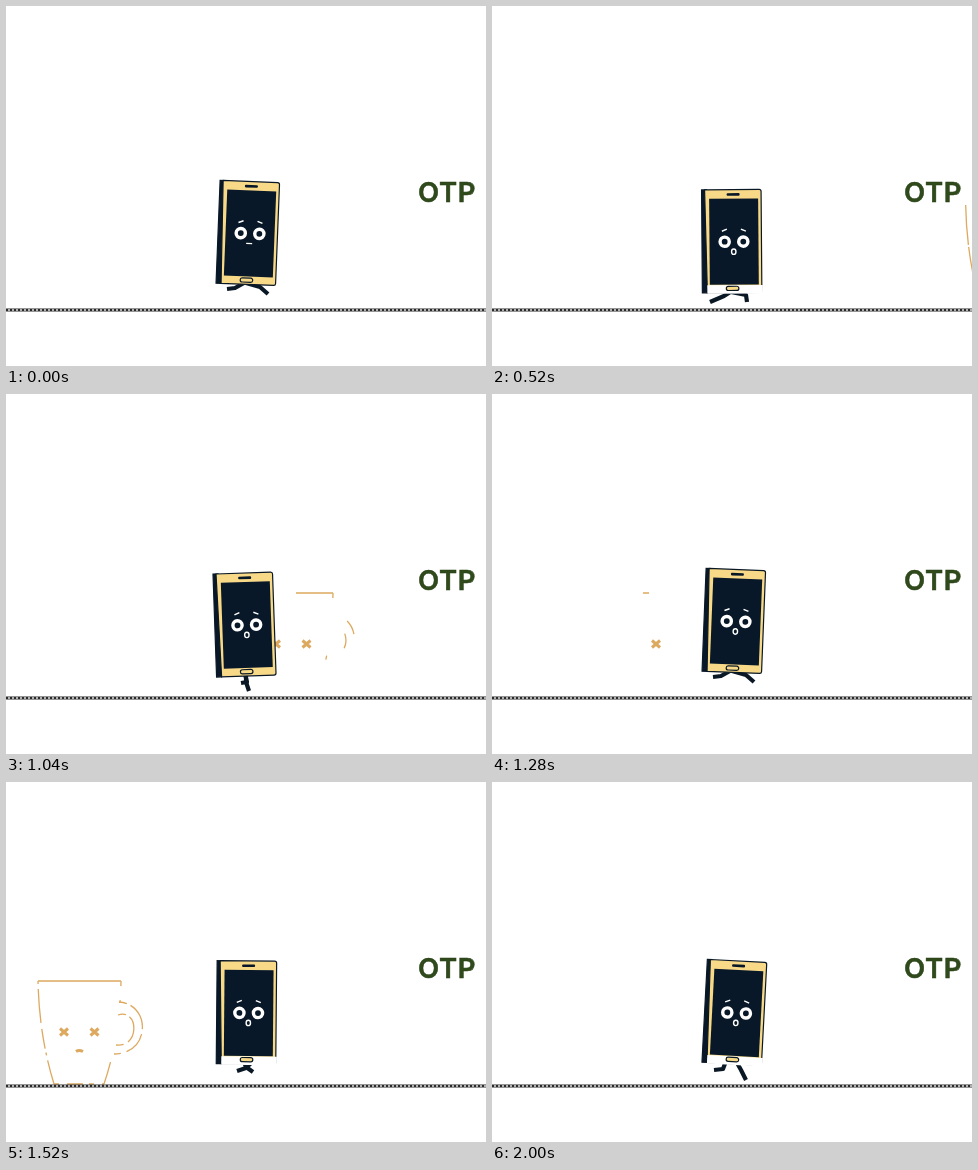
These frames come from a looping animation (480x360 px, 2.04 s). An HTML page:

```html
<!DOCTYPE html>
<html lang="en">
<head>
<meta charset="utf-8">
<title>Walking phone</title>
<style>
  html, body { margin: 0; width: 100%; height: 100%; overflow: hidden; background: #fff; }
  svg { display: block; width: 100vw; height: 100vh; }
  .otp { font: 600 27.5px Inter, "Open Sans", sans-serif; letter-spacing: .7px; fill: #2f4a1b; stroke: #263c14; stroke-width: .5; }
  .mug { fill: none; stroke: #dda95f; stroke-width: 1.3; }
  .mug .face { stroke-width: 3; }
  .leg { fill: none; stroke: #0a1826; stroke-width: 4.2; stroke-linejoin: round; }
  .gold { fill: #f7d988; }
  .navy { fill: #081828; }
  .line { stroke: #0a1826; stroke-width: 1.2; }
  .white { fill: none; stroke: #fff; stroke-width: 1.4; }
</style>
</head>
<body>
<svg viewBox="0 0 480 360">
  <text class="otp" x="412" y="196">OTP</text>

  <g id="mug" class="mug">
    <path id="left" d="M-26 199Q-25 253-10 302"/>
    <path id="rim" d="M-26 199H57"/>
    <path id="right" d="M57 199Q56 255 40 302"/>
    <path id="base" d="M-10 302H40"/>
    <path id="handle" d="M55 220C87 222 87 272 50 272M54 233C75 226 76 266 52 263"/>
    <path id="eyeL" class="face" d="M-4 246.500l8 7m0-7l-8 7"/>
    <path id="eyeR" class="face" d="M26.500 246.500l8 7m0-7l-8 7"/>
    <path id="frown" class="face" d="M12 269.500q3-2 7 0"/>
  </g>

  <path d="M0 304H480" stroke="#2b2b2b" stroke-width="3"/>
  <path d="M2 304H480" stroke="#dcdcdc" stroke-width="1.3" stroke-dasharray="2 2"/>

  <path id="legA" class="leg"/>
  <path id="legB" class="leg"/>

  <g id="phone">
    <path class="navy line" d="M-32-52H-27V51H-32Z"/>
    <path class="gold line" d="M-29-52H25.500Q27.500-52 27.500-50V49Q27.500 51 25.500 51H-27Z"/>
    <path id="strip" fill="#fff" d="M-27 43.500H28.500V52H-27Z"/>
    <rect class="navy" x="-24.500" y="-43" width="49" height="86"/>
    <rect class="navy" x="-7" y="-48.500" width="13" height="2.600" rx="1"/>
    <rect class="gold line" x="-8" y="44.600" width="12.500" height="4.200" rx="2"/>
    <g fill="#fff"><circle cx="-9.300" r="6.300"/><circle cx="9.300" r="6.300"/></g>
    <g class="navy"><circle cx="-9.300" r="2.900"/><circle cx="9.300" r="2.900"/></g>
    <path class="white" d="M-12-10.500l5-2M7-12.500l5 2"/>
    <path id="flat" class="white" stroke-width="2" d="M-3.500 10H2.500"/>
    <ellipse id="open" class="white" cy="10" cx="-.3" rx="2.200" ry="2.700"/>
  </g>
</svg>
<script>
const LOOP = 2040, STEP = 40, STRIDE = 16;
const el = id => document.getElementById(id);
const wave = x => Math.cos(2 * Math.PI * x);

// Stride phase, then hip, knee and foot of each leg
const gait = [
  [0,  [238,277, 229,282, 221,283], [240,277, 254,281, 262,288]],
  [2,  [234,279, 231,287, 222,288], [244,279, 249,288, 254,298]],
  [4,  [243,288, 239,293, 234,294], [243,288, 239,295, 236,302]],
  [6,  [238,280, 240,285, 247,290], [246,280, 240,286, 231,289]],
  [8,  [240,277, 252,281, 260,288], [238,277, 228,281, 220,283]],
  [10, [240,280, 240,288, 243,297], [239,280, 241,288, 235,289]],
  [13, [240,285, 232,290, 218,296], [234,285, 254,289, 255,296]]
];
gait.push([STRIDE, gait[0][1], gait[0][2]]);

// Broken outlines of the mug: end time, then the dash pattern of each visible part
const sketches = [
  [920,  { left: '40 2 70 0', rim: '0 30 17 99', right: '0 18 6 60 22 0', base: '30 3',
           handle: '0 6 60 4 16 5', eyeL: '', eyeR: '', frown: '' }],
  [1160, { rim: '0 46 37 9', right: '5 58 4 99', handle: '0 18 15 200', eyeL: '', eyeR: '' }],
  [1400, { rim: '0 13 6 99', eyeL: '' }],
  [LOOP, { left: '3 5 34 6 20 4', rim: '', right: '5 14 3 60 22 0', base: '5 8 16 6',
           handle: '8 4 28 5 24 6', eyeL: '', eyeR: '', frown: '' }]
];
const mugParts = ['left', 'rim', 'right', 'base', 'handle', 'eyeL', 'eyeR', 'frown'];

const show = (id, on) => el(id).setAttribute('visibility', on ? 'visible' : 'hidden');

function drawLegs(phase) {
  const i = gait.findIndex(k => k[0] > phase);
  const from = gait[i - 1], to = gait[i];
  const mix = (phase - from[0]) / (to[0] - from[0]);
  ['legA', 'legB'].forEach((id, n) => {
    const points = from[n + 1].map((v, j) => v + (to[n + 1][j] - v) * mix);
    el(id).setAttribute('d', 'M' + points.join(' '));
  });
}

function drawPhone(t, phase) {
  const sway = wave((phase - 2) / STRIDE);
  const drop = ((1 - wave(phase / 8)) / 2) ** 1.6;
  const x = 242.7 + 1.9 * sway, y = 227.5 + 10.5 * drop;
  el('phone').setAttribute('transform', `translate(${x} ${y}) rotate(${0.5 + 2.5 * sway})`);
  show('strip', t > 0 && t < 640 || t >= 1400);
  show('flat', t < 240);
  show('open', t >= 240);
}

function drawMug(t) {
  el('mug').setAttribute('transform', `translate(${376 - (t - 800) * 106 / 240} 0)`);
  const parts = sketches.find(s => t < s[0])[1];
  for (const id of mugParts) {
    show(id, id in parts);
    el(id).setAttribute('stroke-dasharray', parts[id] || 'none');
  }
}

function draw(time) {
  const frame = Math.floor(time % LOOP / STEP), t = frame * STEP;
  const phase = frame % STRIDE;
  drawLegs(phase);
  drawPhone(t, phase);
  drawMug(t);
}

const start = performance.now();
function tick() {
  draw(performance.now() - start);
  requestAnimationFrame(tick);
}
tick();
</script>
</body>
</html>
```
